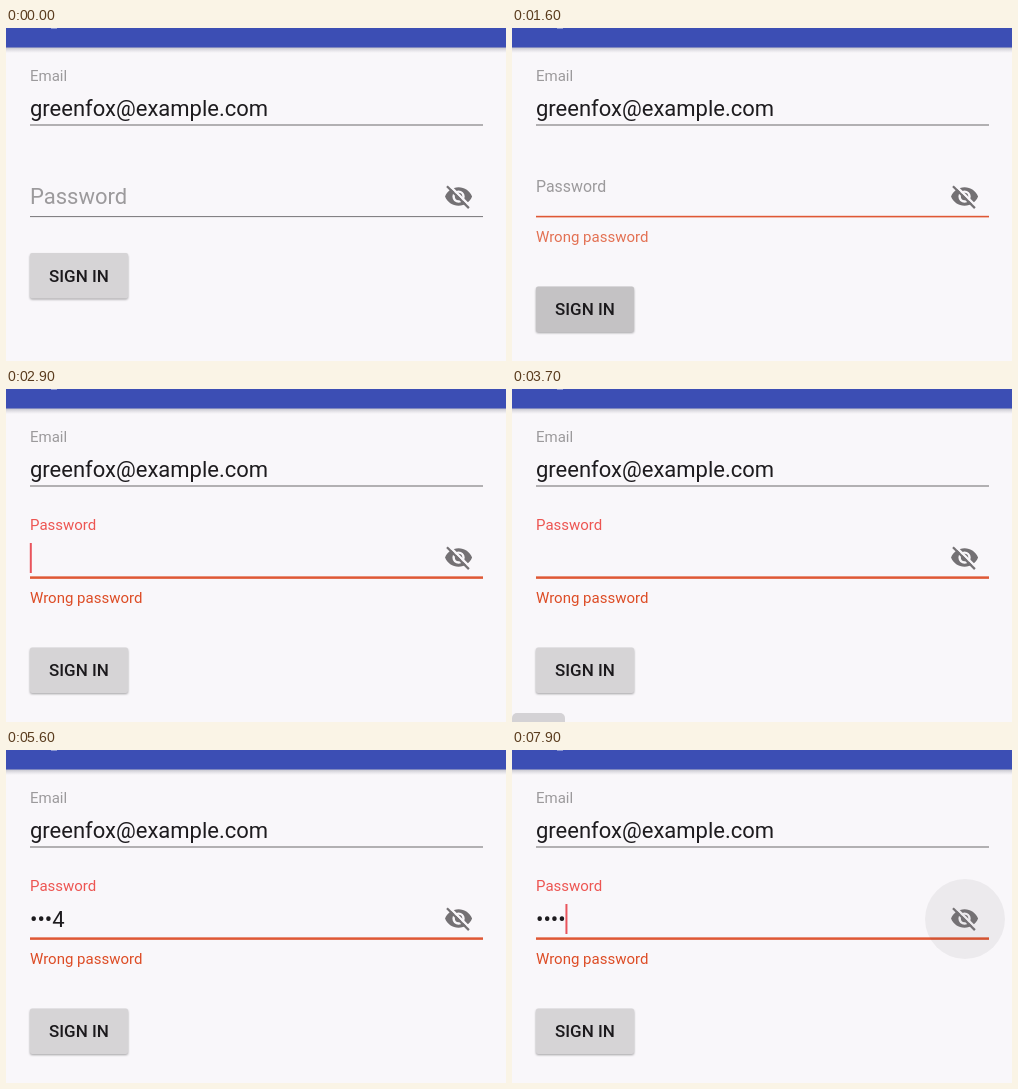
An HTML page that plays this animation: 500 px wide and 333 px high, repeating every 8000 ms.

```html
<!DOCTYPE html>
<html lang="en">
<head>
<meta charset="utf-8">
<title>Sign in form</title>
<style>
  html, body { margin: 0; width: 100%; height: 100%; overflow: hidden; background: #f9f7fa; }
  svg { display: block; width: 100vw; height: 100vh; }
  text { font-family: Roboto, Arial, sans-serif; white-space: pre; }
  .input { font-size: 22px; fill: #1d1b1e; }
  .small { font-size: 15px; }
</style>
</head>
<body>
<svg viewBox="0 0 500 333">
  <defs>
    <linearGradient id="shade" x2="0" y2="1">
      <stop stop-color="#8f8f9c" stop-opacity=".55"/>
      <stop offset="1" stop-color="#b0b0b8" stop-opacity="0"/>
    </linearGradient>
    <filter id="soft" x="-10%" y="-20%" width="120%" height="150%">
      <feGaussianBlur stdDeviation="1.2"/>
    </filter>
    <mask id="slashGap" maskUnits="userSpaceOnUse" x="0" y="0" width="24" height="24">
      <rect width="24" height="24" fill="#fff"/>
      <path d="M3.9 2.3 22 20.4" stroke="#000" stroke-width="1.9"/>
    </mask>
  </defs>

  <rect width="500" height="333" fill="#f9f7fa"/>
  <rect y="19" width="500" height="6" fill="url(#shade)"/>
  <rect width="500" height="19.5" fill="#3c4eb4"/>
  <rect x="45" width="6" height="1" fill="#fff" opacity=".4"/>

  <text class="small" x="24" y="53" fill="#9c9a9c">Email</text>
  <text class="input" x="24" y="88">greenfox@example.com</text>
  <rect x="24" y="96.5" width="453" height="1" fill="#6c6a6d"/>

  <text id="label" x="24">Password</text>
  <text id="value" class="input" x="24" y="177"></text>
  <rect id="cursor" y="154" width="2" height="30" fill="#e9545c"/>
  <rect id="line" x="24" width="453"/>
  <text id="error" class="small" x="24" y="214" fill="#dd4c25">Wrong password</text>

  <circle id="ripple" cx="453" cy="169"/>
  <g transform="translate(437.8 153.8) scale(1.23)" fill="#747174">
    <g id="eye">
      <path fill-rule="evenodd" d="M12 4.5C7 4.5 2.73 7.61 1 12c1.73 4.39 6 7.5 11 7.5s9.27-3.11 11-7.5c-1.73-4.39-6-7.5-11-7.5zM7 12a5 5 0 0 0 10 0a5 5 0 0 0-10 0z"/>
      <circle cx="12" cy="12" r="3"/>
    </g>
    <path id="slash" d="M2.6 3.6 20.4 21.4" stroke="#747174" stroke-width="1.8"/>
  </g>

  <g id="button">
    <rect x="24" y="226.5" width="98" height="45" rx="2" fill="#000" opacity=".35" filter="url(#soft)"/>
    <rect x="24" y="225" width="98" height="45.5" rx="2" fill="#d6d4d6"/>
    <rect id="press" x="24" y="225" width="98" height="45.5" rx="2"/>
    <text x="43" y="253.5" font-size="17" font-weight="500" fill="#1b191c">SIGN IN</text>
  </g>
  <rect id="key" y="324" width="53" height="20" rx="5" fill="#d4d2d5"/>
</svg>

<script>
const LOOP = 8000;
const FAIL = 1400, FOCUS = 2800;
const SHOW = 6700, HIDE = 7700, MASK_LAST = 6400;
const TYPED = [3800, 4300, 4700, 4900];
const KEY_DOWN = [3600, 4100, 4500, 4800];
const KEY_UP = [3800, 4400, 4700, 5000];
const BULLET = 7.41, DIGIT = 12.36;

const el = id => document.getElementById(id);
const set = (id, attrs) => {
  for (const name in attrs) el(id).setAttribute(name, attrs[name]);
};
const ramp = (t, a, b) => Math.min(1, Math.max(0, (t - a) / (b - a)));
const mix = (a, b, p) => a + (b - a) * p;
const within = (t, a, b) => t >= a && t < b;

function drawLabel(t) {
  const p = ramp(t, 1500, 1800);
  const shrink = 1 - (1 - p) ** 5;
  set('label', {
    y: mix(176, 140.5, p),
    'font-size': mix(22, 15, shrink),
    fill: t >= FOCUS ? '#ed5552' : '#9c9a9c'
  });
}

function drawLine(t) {
  const height = t >= FOCUS ? 2.5 : t >= FAIL ? 1.6 : 1;
  set('line', { y: 188.6 - height / 2, height, fill: t >= FAIL ? '#df5835' : '#777578' });
}

function drawValue(t, plain) {
  const count = TYPED.filter(at => t >= at).length;
  const digits = '1234'.slice(0, count);
  const tail = t < MASK_LAST ? 1 : 0;
  const hidden = plain ? 0 : Math.max(0, count - tail);
  el('value').textContent = '•'.repeat(hidden) + digits.slice(hidden);

  // The blink restarts with focus and with the last key.
  const blink = start => (t - start) % 1000 < 500;
  const on = t >= TYPED[3] ? blink(TYPED[3])
    : t >= TYPED[0] || t >= FOCUS && blink(FOCUS);
  set('cursor', {
    x: 23.8 + hidden * BULLET + (count - hidden) * DIGIT,
    opacity: on ? 1 : 0
  });
}

function drawEye(t, plain) {
  const second = t >= 7400;
  const start = second ? 7400 : 6400;
  set('ripple', {
    r: mix(14, 40, 1 - (1 - ramp(t, start, start + 400)) ** 2),
    opacity: second ? .05 * ramp(t, 7350, 7600)
      : .035 * ramp(t, 6350, 6600) * (1 - ramp(t, 6950, 7250))
  });
  set('slash', { opacity: plain ? 0 : 1 });
  set('eye', { mask: plain ? 'none' : 'url(#slashGap)' });
}

function draw(t) {
  const plain = within(t, SHOW, HIDE);
  drawLabel(t);
  drawLine(t);
  drawValue(t, plain);
  drawEye(t, plain);
  set('error', { opacity: ramp(t, FAIL - 50, 1670) });
  set('button', { transform: `translate(0 ${t >= FAIL ? 33.5 : 0})` });
  set('press', { opacity: .085 * ramp(t, 1150, 1400) * (1 - ramp(t, 1650, 2050)) });

  const key = KEY_DOWN.findIndex((down, i) => within(t, down, KEY_UP[i]));
  set('key', { x: key * 50, opacity: key < 0 ? 0 : 1 });
}

const began = performance.now();
function tick() {
  draw((performance.now() - began) % LOOP);
  requestAnimationFrame(tick);
}
tick();
</script>
</body>
</html>
```
